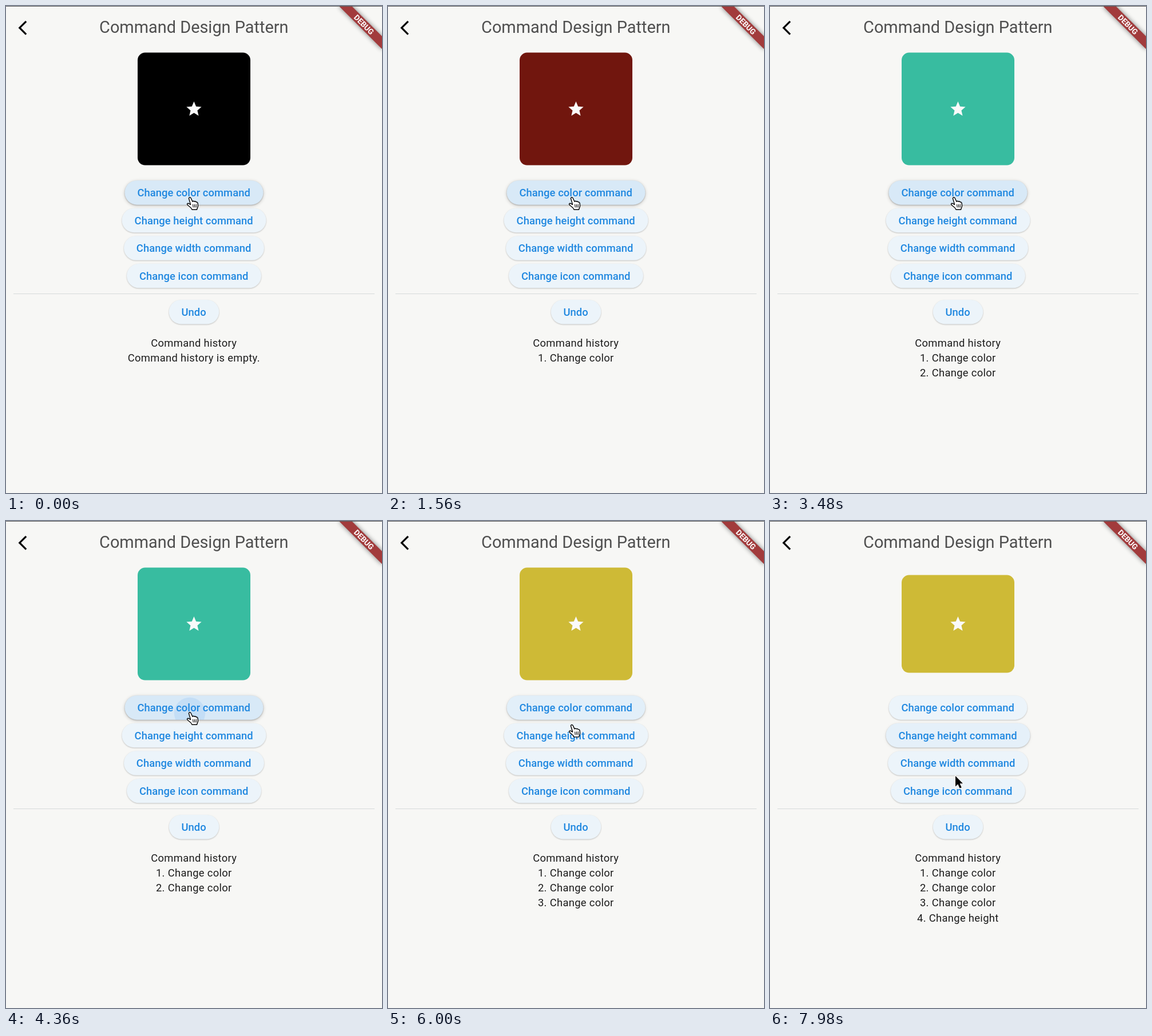
Animation of 657x852 px, one loop 8 s. Source, as an HTML page:

```html
<!DOCTYPE html>
<html lang="en">
<head>
<meta charset="utf-8">
<title>Command Design Pattern</title>
<style>
  html, body { margin: 0; width: 100%; height: 100%; overflow: hidden; background: #f7f7f5; }
  svg { display: block; width: 657px; height: 852px; }
  text { font-family: Roboto, sans-serif; font-size: 18.38px; text-anchor: middle; }
  .title { font-size: 28.9px; fill: #4f4f4f; }
  .label { font-weight: 500; letter-spacing: .07px; fill: #2088e0; }
  .body { letter-spacing: .33px; fill: #1c1c1c; }
  .debug { font-size: 13.4px; font-weight: 700; fill: #fff; }
</style>
</head>
<body>
<svg viewBox="0 0 657 852">
  <defs>
    <filter id="soft" x="-20%" y="-50%" width="140%" height="200%"><feGaussianBlur stdDeviation="1.1"/></filter>
    <filter id="wide" x="-20%" y="-50%" width="140%" height="200%"><feGaussianBlur stdDeviation="3"/></filter>
    <filter id="ribbon" x="-30%" y="-200%" width="160%" height="500%"><feGaussianBlur stdDeviation="4.5"/></filter>
    <clipPath id="pill"><rect x="207.5" y="305.2" width="242" height="42.5" rx="21.2"/></clipPath>
  </defs>

  <rect width="657" height="852" fill="#f7f7f5"/>
  <path d="M35.2 26.8L23.8 38.2L35.2 49.6" fill="none" stroke="#000" stroke-width="3.2"/>
  <text class="title" x="328.3" y="47.4">Command Design Pattern</text>

  <rect id="card" x="230" width="197" rx="13"/>
  <path transform="translate(312.7 164.4) scale(1.313)" fill="#fafafa"
    d="M12 17.27L18.18 21l-1.64-7.03L22 9.24l-7.19-.61L12 2 9.19 8.63 2 9.24l5.46 4.73L5.82 21z"/>

  <g id="buttons"></g>
  <path d="M13 503.5H644" stroke="#d6dadb"/>
  <text class="body" x="328.3" y="595.6">Command history</text>
  <g id="history"></g>

  <g transform="translate(657 1) rotate(45)">
    <rect x="-52.5" y="36.8" width="105" height="15.75" opacity=".5" filter="url(#ribbon)"/>
    <rect x="-60" y="36.8" width="120" height="15.75" fill="#a23b3c"/>
    <text class="debug" x="0" y="49.4">DEBUG</text>
  </g>
  <rect width="657" height="1" fill="#5a5a5a"/>

  <g id="cursor">
    <g id="hand" fill="#fff" stroke="#000" stroke-width="1.4" stroke-linejoin="round" stroke-linecap="round">
      <path d="M-1.6 1.6Q-1 -1.2 1.6 0.4Q2.6 1.6 4.9 7.2Q6.6 5.4 8.2 7.2Q10 6.2 11.3 8Q13.8 7.6 14.2 10.6L14.5 15Q13.4 18.4 12.5 21.2H4Q2.6 18 -.5 15.8Q-4 13.4 -4.5 11.6Q-3.6 9 -.4 11.4L1.6 12.4Z"/>
      <path d="M5.6 12.4L6.2 17M8.4 12.2L8.8 17M11.2 12L11.3 17" fill="none" stroke-width="1.1"/>
    </g>
    <path id="arrow" d="M0 0V18.4L4.3 14.5L7.6 21.6L10.8 20.2L7.6 13.2H13Z"
      stroke="#fff" stroke-width="1.6" paint-order="stroke"/>
  </g>
</svg>

<script>
const LOOP = 8000;
const CENTER = 328.5;
const BUTTON_H = 42.5;
const PITCH = 48.55;
const TWEEN = 20;               // steps in a card transition
const HEIGHT_CLICK = 150;
const COLOR_CLICKS = [18, 50, 95.6];
const COLORS = [[0, 0, 0], [141, 27, 17], [56, 188, 160], [206, 186, 54]];
const BASE = [236, 244, 250], HOVER = [216, 233, 247];

const $ = id => document.getElementById(id);
const clamp = v => Math.min(1, Math.max(0, v));
const progress = (n, start, length) => clamp((n - start) / length);
const lerp = (a, b, k) => a + (b - a) * k;
const mix = (a, b, k) => a.map((v, i) => lerp(v, b[i], k));
const rgb = c => `rgb(${c.map(Math.round)})`;

function add(parent, name, attrs, content = '') {
  const node = document.createElementNS('http://www.w3.org/2000/svg', name);
  for (const key in attrs) node.setAttribute(key, attrs[key]);
  node.textContent = content;
  return parent.appendChild(node);
}

function addButton(label, cy, width) {
  const group = add($('buttons'), 'g', {});
  const pill = (dy, extra) => add(group, 'rect', {
    x: CENTER - width / 2, y: cy - BUTTON_H / 2 + dy,
    width, height: BUTTON_H, rx: BUTTON_H / 2, ...extra
  });
  pill(1, { opacity: .22, filter: 'url(#soft)' });
  const lift = pill(1.6, { opacity: 0, filter: 'url(#wide)' });
  const face = pill(0, { fill: rgb(BASE) });
  const ripple = add(group, 'g', {});
  add(group, 'text', { class: 'label', x: 328.2, y: Math.round(cy + 6.7) }, label);
  return { lift, face, ripple };
}

const [colorButton, heightButton] = [
  ['Change color command', 242], ['Change height command', 252],
  ['Change width command', 245], ['Change icon command', 235]
].map(([label, width], i) => addButton(label, 326.4 + i * PITCH, width));
addButton('Undo', 535.2, 87.5);

colorButton.ripple.setAttribute('clip-path', 'url(#pill)');
const splash = add(colorButton.ripple, 'circle', { cx: 321, cy: 336, fill: '#1e88e5' });

const addLine = (content, row) =>
  add($('history'), 'text', { class: 'body', x: 328.3, y: 621.9 + row * 26.26 }, content);
const emptyLine = addLine('Command history is empty.', 0);
const lines = [...COLOR_CLICKS, HEIGHT_CLICK].map((at, i) => ({
  at, node: addLine(`${i + 1}. Change ${i < 3 ? 'color' : 'height'}`, i)
}));
const show = (node, on) => node.setAttribute('visibility', on ? 'visible' : 'hidden');

function setHover(button, k) {
  button.face.setAttribute('fill', rgb(mix(BASE, HOVER, k)));
  button.lift.setAttribute('opacity', .18 * k);
}

function drawCard(n) {
  const fill = COLOR_CLICKS.reduce(
    (c, at, i) => mix(c, COLORS[i + 1], progress(n, at, TWEEN)), COLORS[0]);
  const height = lerp(197, 171, progress(n, HEIGHT_CLICK, TWEEN));
  $('card').setAttribute('fill', rgb(fill));
  $('card').setAttribute('y', 180.1 - height / 2);
  $('card').setAttribute('height', height);
}

function drawRipple(n) {
  const click = COLOR_CLICKS.find(at => n >= at - 4 && n < at + 15);
  if (click === undefined) return splash.setAttribute('opacity', 0);
  const since = n - click;
  const grow = 1 - (1 - progress(since, 0, 9)) ** 2;
  splash.setAttribute('r', lerp(20 + 12 * progress(since, -4, 4), 136, grow));
  splash.setAttribute('opacity', .107 * progress(since, -5, 3) * (1 - progress(since, 9, 6)));
}

function drawCursor(n) {
  const arrive = 1 - (1 - progress(n, 126, 6)) ** 2;
  const leave = progress(n, 166.5, 4.5) ** 2;
  const x = 321 + 3 * leave;
  const y = 335 + 39 * arrive + 72 * leave;
  const onButton = (y - 305) % PITCH < BUTTON_H;
  $('cursor').setAttribute('transform', `translate(${x} ${y})`);
  show($('hand'), onButton);
  show($('arrow'), !onButton);
}

// Steps come in threes every 140 ms, held for 20, 100 and 20 ms.
function stepAt(t) {
  const rest = t % 140;
  return 3 * Math.floor(t / 140) + (rest < 20 ? 0 : rest < 120 ? 1 : 2);
}

function render(t) {
  const n = stepAt(t);
  drawCard(n);
  drawRipple(n);
  drawCursor(n);
  setHover(colorButton, 1 - progress(n, 127, 2));
  setHover(heightButton, progress(n, 128, 2) * (1 - progress(n, 169, 3.2)));
  show(emptyLine, n < lines[0].at);
  lines.forEach(({ at, node }) => show(node, n >= at));
}

let start;
function tick(now) {
  start ??= now;
  render((now - start) % LOOP);
  requestAnimationFrame(tick);
}
render(0);
requestAnimationFrame(tick);
</script>
</body>
</html>
```
